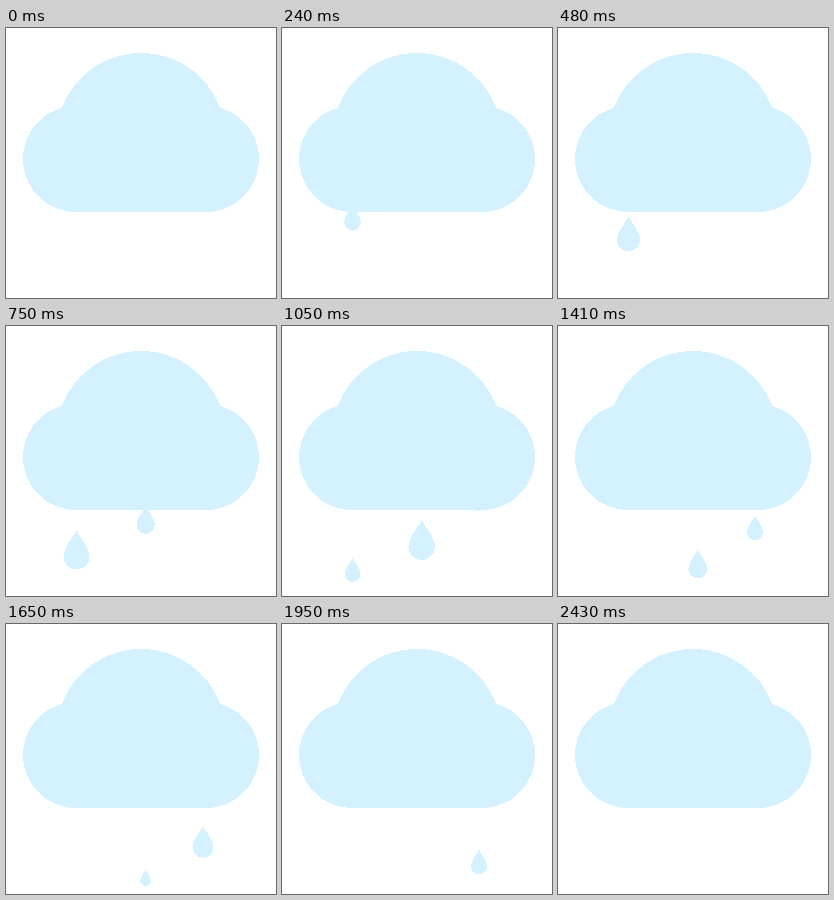
Recreate the animation shown at these times as an HTML page. Size 270 px wide and 270 px high, loop 2730 ms.

```html
<!DOCTYPE html>
<html lang="en">
<head>
<meta charset="utf-8">
<title>Rain cloud</title>
<style>
  html, body { margin: 0; width: 100%; height: 100%; overflow: hidden; background: #fff; }
  svg { display: block; width: 100%; height: 100%; fill: #d3f1fe; shape-rendering: crispEdges; }
</style>
</head>
<body>
<svg viewBox="0 0 270 270">
  <g id="rain"></g>
  <path d="M50.5 109.5A84.5 84.5 0 0 1 219.5 109.5Z"/>
  <rect x="17" y="78" width="236" height="106" rx="53"/>
</svg>
<script>
const LOOP = 2730;
const TOP = 174, SPEED = .0665; // start height, and fall in px per ms
const DROP = 'M0-.75C.08-.6 .5-.05 .5.25A.5.5 0 0 1-.5.25C-.5-.05-.08-.6 0-.75Z';

const rain = document.getElementById('rain');

function makeDrop(x, start, life, size) {
  const path = document.createElementNS('http://www.w3.org/2000/svg', 'path');
  path.setAttribute('d', DROP);
  rain.append(path);
  return { x, start, life, size, path };
}

const drops = [
  makeDrop(70.5, 0, 1350, 28.6),
  makeDrop(139.7, 450, 1350, 28.6),
  makeDrop(197, 990, 1440, 22.3)
];

// Swells steadily until halfway down, then shrinks a little faster.
function scaleAt(progress) {
  const fromMiddle = 2 * progress - 1;
  return fromMiddle < 0 ? 1 + .65 * fromMiddle : 1 - .8 * fromMiddle;
}

function draw(now) {
  const t = now % LOOP;
  for (const { x, start, life, size, path } of drops) {
    const age = t - start;
    const falling = age >= 0 && age < life;
    path.setAttribute('visibility', falling ? 'visible' : 'hidden');
    if (falling) {
      path.setAttribute('transform',
        `translate(${x} ${TOP + SPEED * age}) scale(${size * scaleAt(age / life)})`);
    }
  }
}

const begin = performance.now();
function frame() {
  draw(performance.now() - begin);
  requestAnimationFrame(frame);
}
frame();
</script>
</body>
</html>
```
